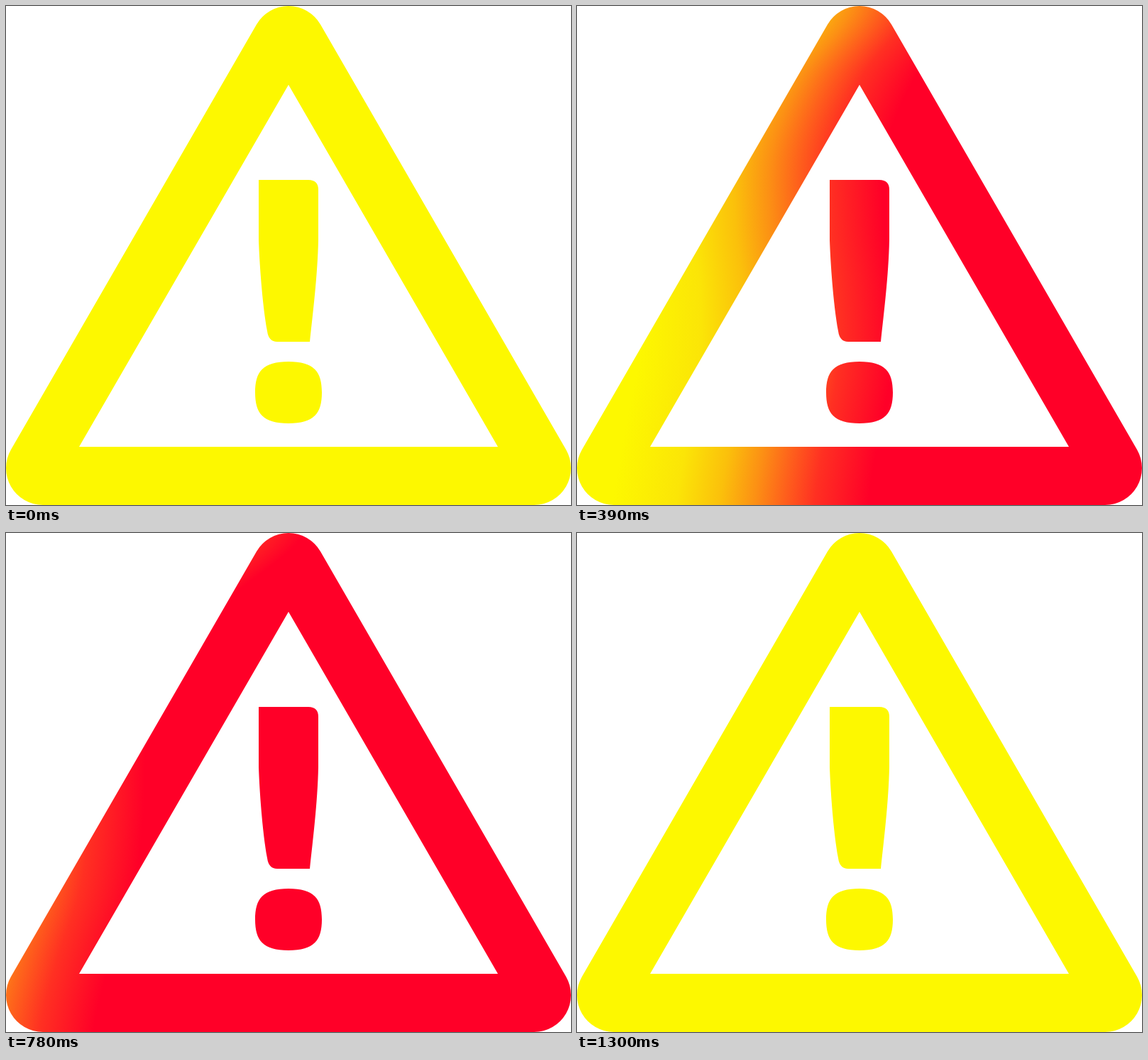
Animation, 796 px wide and 703 px high, one loop 1.43 s. Source, as an HTML page with a canvas:

```html
<!DOCTYPE html>
<html lang="en">
<head>
<meta charset="utf-8">
<title>Warning sign</title>
<style>
html, body { margin: 0; width: 100%; height: 100%; overflow: hidden; background: #fff; }
canvas { display: block; }
</style>
</head>
<body>
<canvas id="stage" width="796" height="703"></canvas>
<script>
const W = 796, H = 703, STEP = 130;
const ctx = document.getElementById('stage').getContext('2d');

// Sweep position for each step: 0 is all yellow, 5 is all red.
const SWEEP = [0, 1, 2, 3, 4, 5, 4, 3, 2, 1, 0];

// Colour ramp across the moving edge, left to right.
const RAMP = [
  [0, '#fdf800'], [0.25, '#fbe507'], [0.42, '#fbc00b'], [0.555, '#fc9014'],
  [0.67, '#fe601c'], [0.79, '#ff3022'], [1, '#ff0028']
];
const RAMP_WIDTH = 360, ORANGE = 0.555;

// x of the orange line at evenly spaced heights, for two neighbouring steps.
const EDGE_2 = [516, 487, 488, 506, 533, 548, 545, 537];
const EDGE_3 = [388, 316, 275, 272, 283, 284, 266, 250];

const sign = new Path2D(
  'M353 26A52 52 0 0 1 443 26L789 625A52 52 0 0 1 744 703H52A52 52 0 0 1 7 625Z' +
  'M398 111L103 621H693Z' +
  'M356 245H426Q440 245 440 259V330C439 380 432 435 428 473H382Q370 473 368 458C361 420 357 360 356 330Z' +
  'M398 501C434 501 445 515 445 544.5C445 574 434 588 398 588C362 588 351 574 351 544.5C351 515 362 501 398 501Z'
);

function curve(points, u) {
  const last = points.length - 1;
  const i = Math.min(Math.floor(u * last), last - 1);
  const t = u * last - i;
  const at = k => points[Math.max(0, Math.min(last, k))];
  const [a, b, c, d] = [at(i - 1), at(i), at(i + 1), at(i + 2)];
  return b + t * (c - a + t * (2 * a - 5 * b + 4 * c - d + t * (3 * (b - c) + d - a))) / 2;
}

function paintRow(y, sweep) {
  const edge2 = curve(EDGE_2, y / H), edge3 = curve(EDGE_3, y / H);
  const left = edge2 + (edge3 - edge2) * (sweep - 2) - ORANGE * RAMP_WIDTH;
  const fill = ctx.createLinearGradient(left, 0, left + RAMP_WIDTH, 0);
  RAMP.forEach(([stop, color]) => fill.addColorStop(stop, color));
  ctx.fillStyle = fill;
  ctx.fillRect(0, y, W, 1);
}

function paint(sweep) {
  ctx.globalCompositeOperation = 'source-over';
  if (sweep === 0 || sweep === 5) {
    ctx.fillStyle = RAMP[sweep ? RAMP.length - 1 : 0][1];
    ctx.fillRect(0, 0, W, H);
  } else {
    for (let y = 0; y < H; y++) paintRow(y, sweep);
  }
  ctx.globalCompositeOperation = 'destination-in';
  ctx.fillStyle = '#000';
  ctx.fill(sign, 'evenodd');
}

const start = performance.now();
let shown = -1;

function tick() {
  const elapsed = performance.now() - start;
  const sweep = SWEEP[Math.floor(elapsed / STEP) % SWEEP.length];
  if (sweep !== shown) paint(shown = sweep);
  requestAnimationFrame(tick);
}
tick();
</script>
</body>
</html>
```
